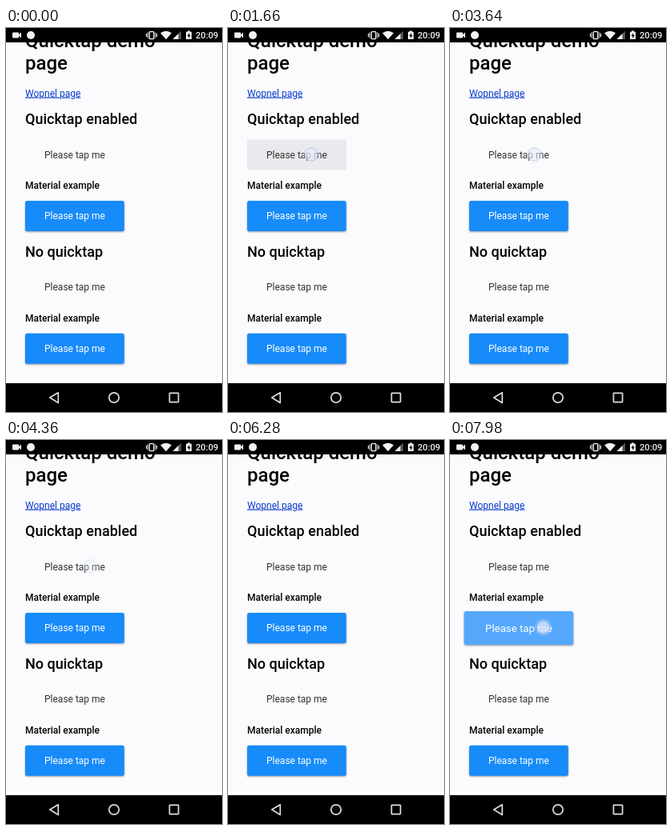
An HTML page that plays this animation: 270 px wide and 480 px high, repeating every 8 s.

```html
<!DOCTYPE html>
<html lang="en">
<head>
<meta charset="utf-8">
<title>Quicktap demo page</title>
<style>
  html, body { margin: 0; width: 100%; height: 100%; overflow: hidden; background: #fbfbfe; }
  svg { display: block; width: 270px; height: 480px; font: 12px Roboto, sans-serif; }
  h1, .title { font-size: 24px; font-weight: 500; }
  .heading { font-size: 18px; font-weight: 500; }
  .label { font-weight: 500; }
  .raised rect { fill: #178bf9; filter: drop-shadow(0 1.2px 1.2px rgba(0, 0, 0, .4)); }
  .raised text { fill: #fff; }
  .plain { fill: #333; }
  .line { fill: none; stroke: #dedede; stroke-width: 1.7; }
</style>
</head>
<body>
<svg viewBox="0 0 270 480">
  <defs>
    <radialGradient id="halo">
      <stop offset=".6" stop-color="#dce8ff" stop-opacity=".4"/>
      <stop offset="1" stop-color="#dce8ff" stop-opacity="0"/>
    </radialGradient>
  </defs>

  <rect width="270" height="480" fill="#fbfbfe"/>
  <rect y="440" width="270" height="4" fill="#fff"/>

  <g class="title">
    <text x="24" y="23.5">Quicktap demo</text>
    <text x="24" y="51.6">page</text>
  </g>
  <text x="24" y="85.5" fill="#0a3acc" text-decoration="underline">Wopnel page</text>

  <g>
    <text class="heading" x="24" y="120">Quicktap enabled</text>
    <rect id="pressed" x="24" y="139.5" width="124" height="38.2" fill="#eaeaee"/>
    <text class="plain" x="48" y="162.7">Please tap me</text>
    <text class="label" x="24" y="201">Material example</text>
    <g class="raised" id="button">
      <rect id="face" x="24" y="216" width="123.8" height="38" rx="2.5"/>
      <text x="48" y="239.2">Please tap me</text>
    </g>
  </g>

  <g transform="translate(0 165.75)">
    <text class="heading" x="24" y="120">No quicktap</text>
    <text class="plain" x="48" y="162.7">Please tap me</text>
    <text class="label" x="24" y="201">Material example</text>
    <g class="raised">
      <rect x="24" y="216" width="123.8" height="38" rx="2.5"/>
      <text x="48" y="239.2">Please tap me</text>
    </g>
  </g>

  <g id="touch">
    <circle r="12" fill="url(#halo)"/>
    <circle r="8" fill="#e8eefc" fill-opacity=".5" stroke="#8c8ca5" stroke-opacity=".4"/>
  </g>

  <!-- status bar -->
  <rect width="270" height="18" fill="#000"/>
  <g fill="#f2f2f2">
    <path d="M9 5.5h6q1 0 1 1v1.7l3-2.6v6.8l-3-2.6v1.7q0 1-1 1h-6q-1 0-1-1v-5q0-1 1-1z"/>
    <circle cx="31" cy="9" r="5"/>
    <rect x="179.2" y="4.6" width="5.6" height="9" rx=".8" fill="none" stroke="#f2f2f2" stroke-width="1.4"/>
    <path d="M177 5.5v7M175.4 7v4M187 5.5v7M188.6 7v4" stroke="#f2f2f2" stroke-width="1"/>
    <path d="M193 6.2q7-5 14 0l-7 8z"/>
    <path d="M219 3.5v10.5h-10.5z" fill-opacity=".35"/>
    <path d="M215.5 7v7h-7z"/>
    <path d="M225 4.8h2v-1.3h3v1.3h2v9.2h-7z"/>
    <path d="M229.2 6l-2.7 4h1.7v3l2.6-4.1h-1.6z" fill="#000"/>
    <text x="237" y="13" font-size="11.2" font-weight="500">20:09</text>
  </g>

  <!-- navigation bar -->
  <rect y="444" width="270" height="36" fill="#000"/>
  <g class="line">
    <path d="M65.3 455.8v12.6L54.8 462.1z" stroke-linejoin="round"/>
    <circle cx="135" cy="462" r="6.2"/>
    <rect x="204.4" y="456.4" width="11.2" height="11.2" rx=".6"/>
  </g>
</svg>

<script>
const LOOP = 8000;
const FIRST = { down: 1300, up: 3400, fade: 1750 };
const SECOND = { down: 6690, end: 7980 };

const get = id => document.getElementById(id);
const clamp = v => Math.min(1, Math.max(0, v));
const mix = (a, b, p) => a + (b - a) * p;
const [pressed, button, face, touch] = ['pressed', 'button', 'face', 'touch'].map(get);

function draw(now) {
  const t = now % LOOP;
  const second = t >= SECOND.down;

  pressed.setAttribute('opacity', t >= FIRST.down && t < FIRST.up + 40 ? 1 : 0);

  const x = second ? 116.5 : mix(104, 105.3, clamp((t - 1660) / 1980));
  const y = second ? 234 : 158;
  const fade = t < FIRST.down ? 0 : 1 - clamp((t - FIRST.up) / FIRST.fade);
  touch.setAttribute('transform', `translate(${x} ${y})`);
  touch.setAttribute('opacity', second ? 1 : fade);

  // The pressed button grows about its centre while its face lightens.
  const p = clamp((t - SECOND.down) / (SECOND.end - SECOND.down));
  const tint = p ** 1.6;
  const color = [[23, 85], [139, 168], [249, 252]].map(([a, b]) => Math.round(mix(a, b, tint)));
  button.setAttribute('transform', `translate(86 235) scale(${1 + .103 * p}) translate(-86 -235)`);
  face.style.fill = `rgb(${color})`;
}

function frame() {
  draw(performance.now());
  requestAnimationFrame(frame);
}
frame();
</script>
</body>
</html>
```
